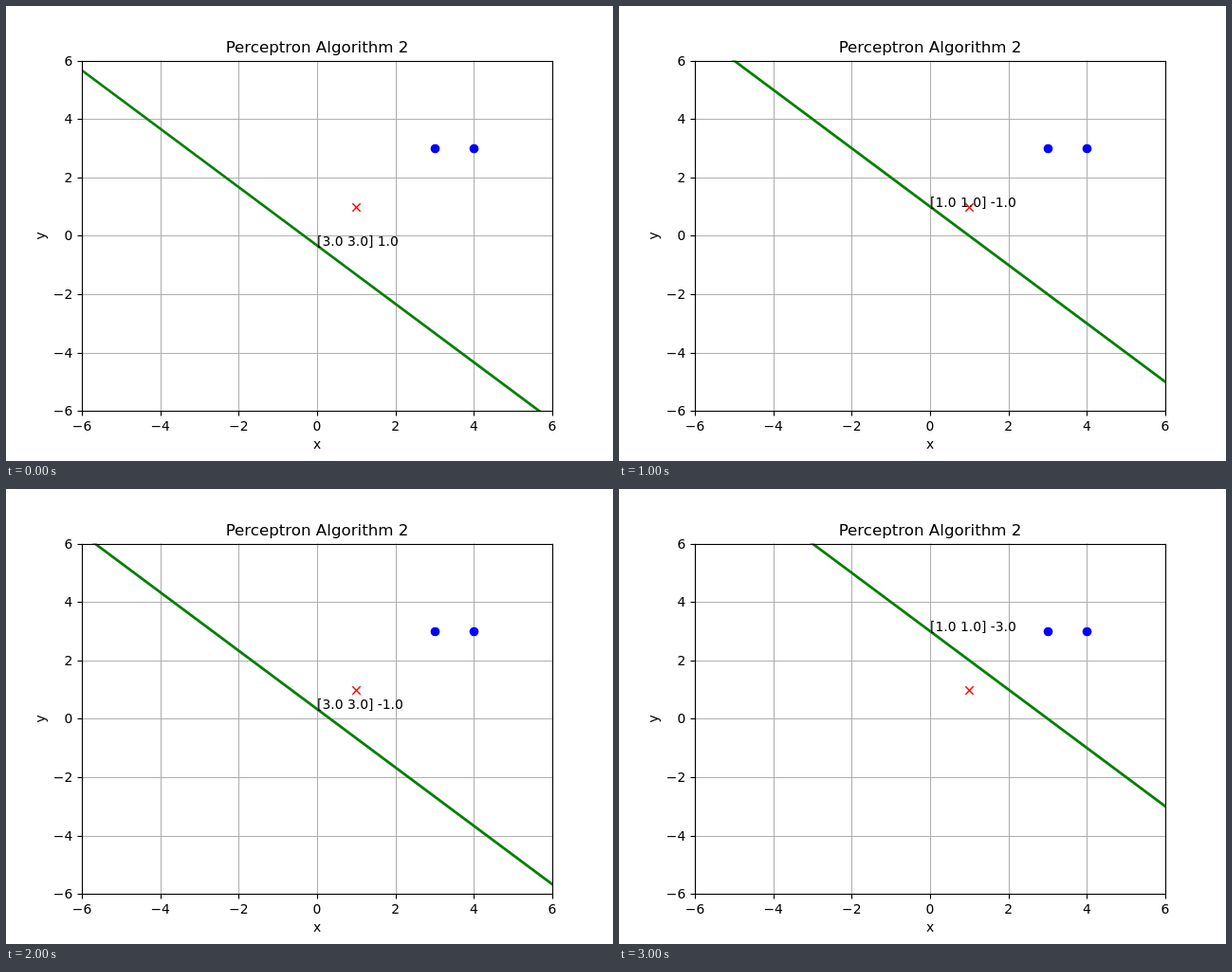
Write an HTML page with a canvas that moves like this. It is 640x480 px and loops after 3500 ms.

```html
<!DOCTYPE html>
<html>
<head>
<meta charset="utf-8">
<style>
html, body { margin: 0; height: 100%; overflow: hidden; background: #fff; }
canvas { display: block; }
</style>
</head>
<body>
<canvas id="plot" width="640" height="480"></canvas>
<script>
const ctx = document.getElementById('plot').getContext('2d');
const PT = 100 / 72;
const STEP = 500;
// [weight, bias] of the classifier, one entry per step
const states = [[3, 1], [2, 0], [1, -1], [1, -1], [3, -1], [2, -2], [1, -3]];
const ticks = [-6, -4, -2, 0, 2, 4, 6];
const LEFT = 80, RIGHT = 576, TOP = 57.6, BOTTOM = 427.2;

const px = x => 328 + x * 124 / 3;
const py = y => 242.4 - y * 30.8;
const snap = v => Math.round(v) + 0.5;

function line(x1, y1, x2, y2, color, width) {
  ctx.strokeStyle = color;
  ctx.lineWidth = width * PT;
  ctx.beginPath();
  ctx.moveTo(x1, y1);
  ctx.lineTo(x2, y2);
  ctx.stroke();
}

function text(str, x, y, align = 'center', size = 10) {
  ctx.font = `${size * PT}px "DejaVu Sans", sans-serif`;
  ctx.textAlign = align;
  ctx.fillStyle = '#000';
  ctx.fillText(str, x, y);
}

function drawAxes() {
  for (const v of ticks) {
    const x = snap(px(v)), y = snap(py(v));
    const label = String(v).replace('-', '\u2212');
    line(x, 427.5, x, 432.5, '#000', 0.8);
    line(80.5, y, 75.5, y, '#000', 0.8);
    text(label, px(v), 448);
    text(label, 70.3, Math.round(py(v) + 5), 'right');
  }
  ctx.lineWidth = 0.8 * PT;
  ctx.strokeRect(80.5, 58.5, 496, 369);
  text('Perceptron Algorithm 2', 328, 49, 'center', 12);
  text('x', 328, 467);
  ctx.save();
  ctx.translate(41, 242.4);
  ctx.rotate(-Math.PI / 2);
  text('y', 0, 0);
  ctx.restore();
}

function drawPoints() {
  ctx.fillStyle = '#00f';
  for (const x of [3, 4]) {
    ctx.beginPath();
    ctx.arc(snap(px(x)), snap(py(3)), 3.5 * PT, 0, 2 * Math.PI);
    ctx.fill();
  }
  const x = snap(px(1)), y = snap(py(1)), r = 3 * PT;
  line(x - r, y - r, x + r, y + r, '#f00', 1);
  line(x - r, y + r, x + r, y - r, '#f00', 1);
}

function draw([w, b]) {
  const cut = -b / w;
  ctx.fillStyle = '#fff';
  ctx.fillRect(0, 0, 640, 480);
  for (const v of ticks) {
    line(snap(px(v)), TOP, snap(px(v)), BOTTOM, '#b0b0b0', 0.8);
    line(LEFT, snap(py(v)), RIGHT, snap(py(v)), '#b0b0b0', 0.8);
  }
  ctx.save();
  ctx.beginPath();
  ctx.rect(LEFT, TOP, RIGHT - LEFT, BOTTOM - TOP);
  ctx.clip();
  line(px(-9), py(cut + 9), px(9), py(cut - 9), '#008000', 2);
  ctx.restore();
  drawPoints();
  drawAxes();
  const n = w.toFixed(1);
  text(`[${n} ${n}] ${b.toFixed(1)}`, px(0), Math.round(py(cut)), 'left');
}

function tick() {
  draw(states[Math.floor(performance.now() / STEP) % states.length]);
  requestAnimationFrame(tick);
}
tick();
</script>
</body>
</html>
```
